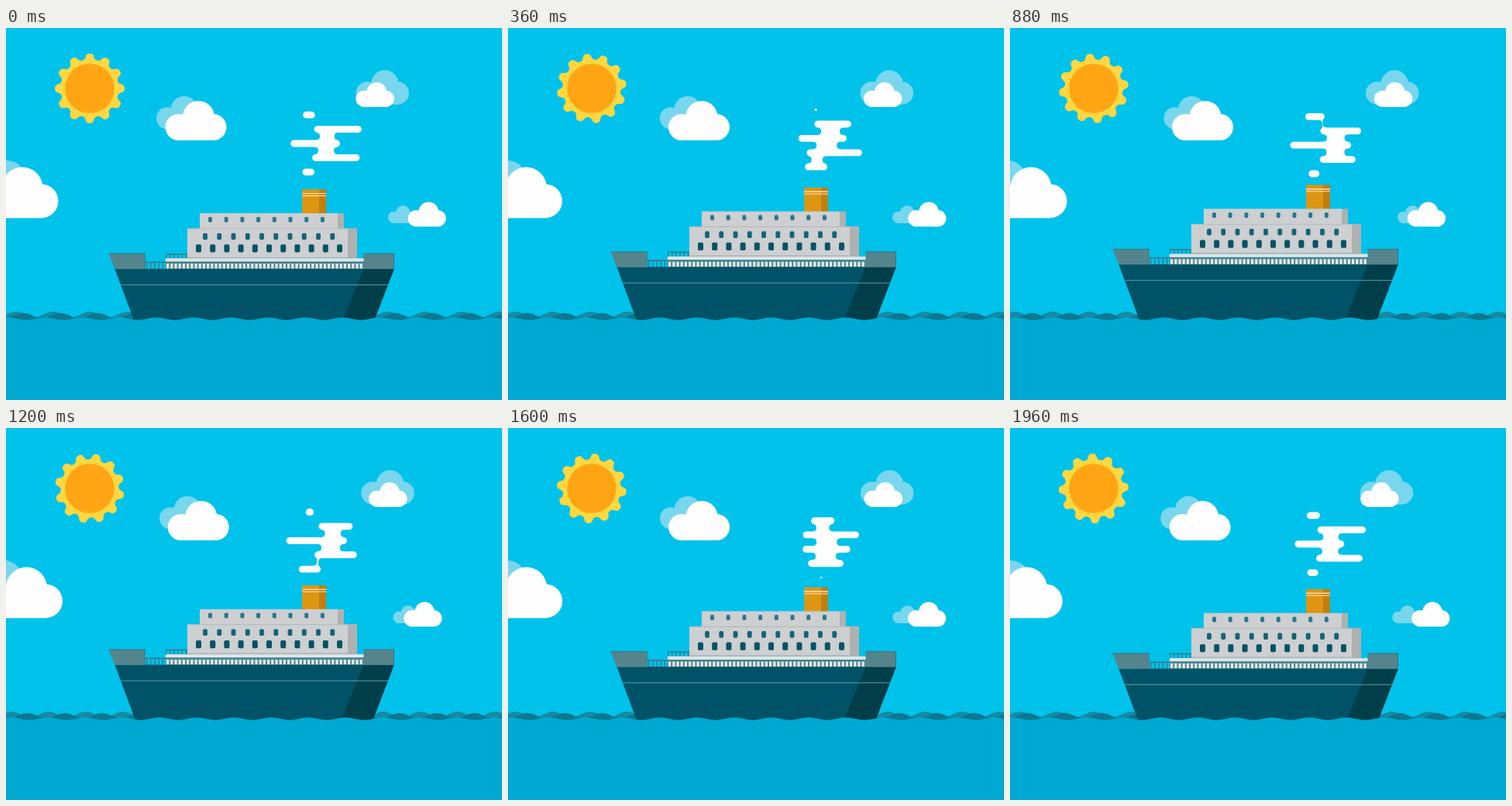
These frames come from a looping animation (640 by 480 pixels, 2000 ms). An HTML page with a canvas:

```html
<!DOCTYPE html>
<html lang="en">
<head>
<meta charset="utf-8">
<title>Ship at sea</title>
<style>
html, body { margin: 0; width: 100%; height: 100%; overflow: hidden; background: #00c2eb; }
canvas { display: block; width: 640px; height: 480px; }
</style>
</head>
<body>
<canvas id="stage" width="640" height="480"></canvas>
<script>
const ctx = document.getElementById("stage").getContext("2d");
const { PI, sin, cos, min, max } = Math;
const LOOP = 2000, STEP = 40;
const SKY = "#00c2eb", SEA = "#00a9d1", WHITE = "#fefefe", PALE = "#78d7ec";
const HULL = "#005366", HULL_DARK = "#003f4a", STEEL = "#55858c", RAIL = "#3d7480";
const WALL = "#cdcfd0", WALL_DARK = "#afb1b1";

function rect(x, y, w, h, color) {
  ctx.fillStyle = color;
  ctx.fillRect(x, y, w, h);
}

function poly(color, ...points) {
  ctx.fillStyle = color;
  ctx.beginPath();
  points.forEach(([x, y]) => ctx.lineTo(x, y));
  ctx.fill();
}

function disc(x, y, r, color) {
  ctx.fillStyle = color;
  ctx.beginPath();
  ctx.arc(x, y, r, 0, PI * 2);
  ctx.fill();
}

function rounded(x, y, w, h, r, color) {
  ctx.fillStyle = color;
  ctx.beginPath();
  ctx.roundRect(x, y, w, h, r);
  ctx.fill();
}

// ---- sun: twelve rounded teeth, a sixth of a turn per second ----
function drawSun(sec) {
  ctx.fillStyle = "#ffd740";
  ctx.beginPath();
  for (let i = 0; i < 360; i++) {
    const a = i * PI / 180, turn = a + sec * PI / 3;
    const r = 41.2 + 4 * Math.tanh(1.7 * cos(12 * a));
    ctx.lineTo(108 + r * sin(turn), 78 - r * cos(turn));
  }
  ctx.fill();
  disc(108, 78, 31.8, "#ffa514");
}

// ---- clouds: one shape, scaled by its width ----
function cloud(x, top, w, color) {
  const lobe = 0.215 * w, base = top + 0.645 * w;
  disc(x + 0.544 * w, top + 0.26 * w, 0.26 * w, color);
  disc(x + lobe, base - lobe, lobe, color);
  disc(x + w - lobe, base - lobe, lobe, color);
  rect(x + lobe, top + 0.3 * w, w - 2 * lobe, 0.345 * w, color);
}

function drawClouds(swing) {
  cloud(194 + 5 * swing, 88, 66, PALE);
  cloud(205.5 + 4 * swing, 94, 79, WHITE);
  cloud(451.5 + 8.5 * swing, 54.5, 68.5, PALE);
  cloud(451.3 + 21 * swing, 70, 49.5, WHITE);
  cloud(493 + 8 * swing, 229, 35.5, PALE);
  cloud(518.5 - 6.5 * swing, 224.5, 49.3, WHITE);
  cloud(-46 - 5 * swing, 171, 88, PALE);
  cloud(-34.5 + 6.8 * swing, 179.5, 102, WHITE);
}

// ---- smoke: one puff a second, swaying as it rises, every other one larger ----
const RISE = 18.4, HALF = 4.4, LIFE = 5;

function puffAt(age, size) {
  const w = size * max(0, cos(PI * (age - 2) / LIFE)) ** 1.2;
  const x = 406 + 9 * sin(PI * age / 4.4) ** 2 - 16 * cos(PI * (age - 0.05));
  return { w, l: x - w / 2, r: x + w / 2, y: 185.8 - RISE * age };
}

// a neck fills part of the overlap of two neighbours, with hollow corners
function drawNeck(low, high) {
  const l = max(low.l, high.l), r = min(low.r, high.r);
  const w = min(26, 0.65 * (r - l - 5));
  if (w <= 0) return;
  const top = high.y + HALF, bottom = low.y - HALF, radius = (bottom - top) / 2;
  ctx.fillStyle = WHITE;
  ctx.beginPath();
  for (const side of [-1, 1]) {
    const x = (l + r + side * w) / 2;
    const fit = puff => max(0, min(radius, side * ((side < 0 ? puff.l : puff.r) - x) - 2));
    const a = fit(high), b = fit(low), mid = (l + r) / 2;
    ctx.moveTo(mid, top - 1.5);
    ctx.lineTo(x + side * a, top - 1.5);
    ctx.lineTo(x + side * a, top);
    ctx.quadraticCurveTo(x, top, x, top + a);
    ctx.lineTo(x, bottom - b);
    ctx.quadraticCurveTo(x, bottom, x + side * b, bottom);
    ctx.lineTo(x + side * b, bottom + 1.5);
    ctx.lineTo(mid, bottom + 1.5);
  }
  ctx.fill("nonzero");
  rect((l + r) / 2 - min(w / 2, 0.6), top - 1.5, min(w, 1.2), bottom - top + 3, WHITE);
}

function drawSmoke(sec) {
  let below = null;
  for (let i = -1; i < LIFE; i++) {
    const age = sec % 1 + i;
    const odd = (Math.floor(sec) + i + 2) % 2;
    const puff = puffAt(age, emitted(sec, age) ? 79 : 64);
    if (puff.w > 0 && age > -0.5) {
      const h = min(HALF, puff.w / 2);
      rounded(puff.l, puff.y - h, puff.w, 2 * h, h, WHITE);
      if (below) drawNeck(below, puff);
      below = puff;
    }
  }
}

// parity of the second in which a puff left the funnel
function emitted(sec, age) {
  return Math.abs(Math.round(sec - age)) % 2 === 1;
}

// ---- ship ----
function row(count, x, gap, y, w, h, color, r = 0) {
  for (let i = 0; i < count; i++) rounded(x + i * gap, y, w, h, r, color);
}

function deck(x, y, w, side, h) {
  rect(x, y, w, h, WALL);
  rect(x + w, y, side, h, WALL_DARK);
}

function drawShip(dy) {
  ctx.save();
  ctx.translate(0, dy);

  rect(382, 208.2, 22, 31, "#de9512");
  rect(404, 208.2, 9, 31, "#c07f10");
  row(2, 382, 0, 213, 31, 1.1, "#f5dfb4");
  rect(382, 216, 31, 1.1, "#f5dfb4");

  deck(250, 239, 178, 8, 20);
  deck(234, 258.8, 207, 12, 38);
  rect(234, 258.5, 219, 0.9, "#b4b7b8");
  row(8, 261, 20.7, 243.7, 5, 7, "#28788b", 1.8);
  row(10, 254.1, 18.25, 264.7, 5.8, 8.6, "#126478", 1.8);
  row(11, 245, 18.2, 279.2, 7, 10.2, "#075366", 1.8);
  rect(234, 295.8, 219, 1.2, "#a9adae");

  rect(206, 291, 28, 1.3, RAIL);
  row(6, 206, 5.2, 291, 1.2, 6, RAIL);
  rect(206, 297.2, 256, 4.4, "#dfe4e5");
  rect(180, 301.6, 282, 1.4, RAIL);
  row(5, 181, 5.2, 302, 1.3, 9, RAIL);
  rect(206, 303, 256, 8, STEEL);
  row(49, 207, 5.2, 304, 3.2, 6.5, "#e6eaeb");

  poly(HULL, [140.3, 310.7], [500.8, 310.7], [468, 396], [172, 396]);
  poly(HULL_DARK, [461.5, 310.7], [500.8, 310.7], [468, 396], [426.5, 396]);
  poly(STEEL, [132.5, 291], [179.5, 291], [179.5, 311], [140.3, 311]);
  rect(461.5, 291, 39.5, 20, STEEL);
  rect(132.5, 290.7, 47, 1.1, RAIL);
  rect(461.5, 290.7, 39.5, 1.1, RAIL);
  rect(178.6, 291, 0.9, 20, RAIL);
  rect(499.8, 291, 1.2, 20, RAIL);
  rect(148.3, 330.8, 344.5, 1.1, "#5993a0");
  ctx.restore();
}

// ---- sea ----
function wave(level, height, crest, color) {
  ctx.fillStyle = color;
  ctx.beginPath();
  ctx.moveTo(0, 480);
  for (let x = 0; x <= 640; x += 2) {
    ctx.lineTo(x, level - height * cos((x - crest) * PI / 24));
  }
  ctx.lineTo(640, 480);
  ctx.fill();
}

function render(ms) {
  const sec = ms / 1000;
  const swing = 1 - Math.abs(1 - sec);
  rect(0, 0, 640, 480, SKY);
  drawSun(sec);
  drawClouds(swing);
  drawSmoke(sec);
  wave(369.6, 3.6, 12.5 - 7 * swing, "#148ba3");
  wave(371.2, 3.4, 22.5 + 7 * swing, "#0b7890");
  drawShip(-6.5 * swing);
  wave(375.2, 1.6, 2 + 5 * swing, SEA);
}

const start = performance.now();
function tick() {
  const ms = (performance.now() - start) % LOOP;
  render(Math.floor(ms / STEP) * STEP);
  requestAnimationFrame(tick);
}
tick();
</script>
</body>
</html>
```
